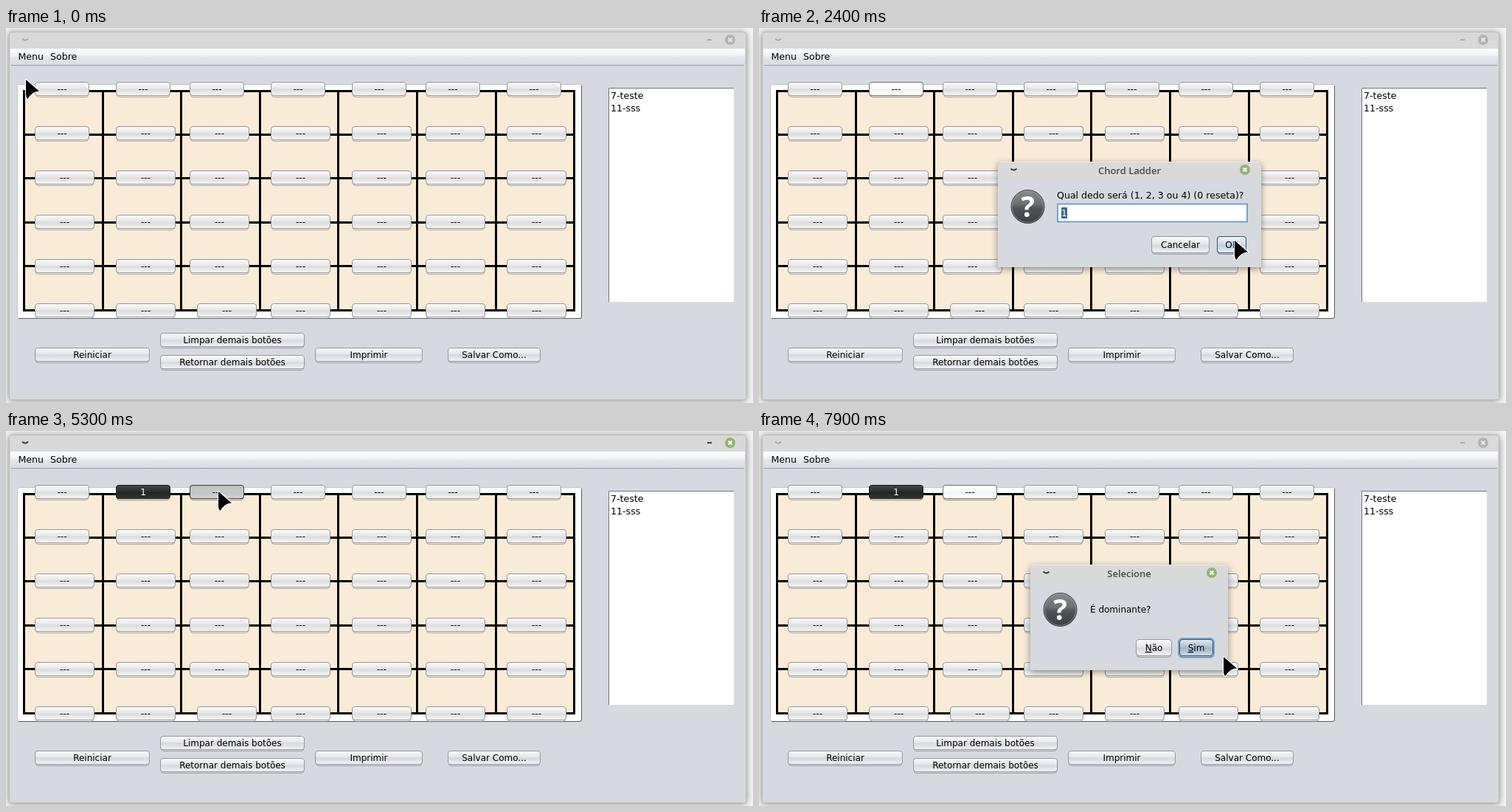
Write an HTML page that moves like this. It is 1013 px wide and 508 px high and loops after 8000 ms.

```html
<!DOCTYPE html>
<html lang="pt">
<head>
<meta charset="utf-8">
<title>Escalas</title>
<style>
html, body { margin: 0; width: 100%; height: 100%; overflow: hidden; background: #f4f4f4; }
svg { display: block; width: 1013px; height: 508px; }
text { font: 12px "DejaVu Sans", sans-serif; fill: #000; white-space: pre; }
.mid { text-anchor: middle; }
.title { font: 600 13px "Open Sans", "Noto Sans", sans-serif; fill: #4a4a4a; text-anchor: middle; }
.ask { font-size: 12.6px; }
.mark { font: 700 39px "Open Sans", sans-serif; fill: #fff; text-anchor: middle; }
#cursor { animation: move 8s infinite linear; }
@keyframes move {
  0% { transform: translate(27px, 70px); animation-timing-function: steps(2); }
  2.5%, 3.75% { transform: translate(348px, 195px); animation-timing-function: steps(5); }
  10% { transform: translate(212px, 96px); animation-timing-function: steps(3); }
  13.75%, 18.75% { transform: translate(191px, 81px); animation-timing-function: steps(4); }
  23.75%, 25% { transform: translate(502px, 246px); animation-timing-function: steps(2); }
  27.5% { transform: translate(695px, 317px); animation-timing-function: steps(2); }
  30%, 38.75% { transform: translate(645px, 288px); animation-timing-function: steps(3); }
  42.5% { transform: translate(572px, 302px); animation-timing-function: steps(3); }
  46.25% { transform: translate(563px, 287px); animation-timing-function: steps(1); }
  47.5%, 51.25% { transform: translate(580px, 287px); animation-timing-function: steps(8); }
  61.25% { transform: translate(310px, 100px); animation-timing-function: steps(3); }
  65%, 66.25% { transform: translate(288px, 82px); animation-timing-function: steps(3); }
  70%, 71.25% { transform: translate(490px, 246px); animation-timing-function: steps(3); }
  75% { transform: translate(651px, 294px); animation-timing-function: steps(1); }
  76.25%, 78.75% { transform: translate(640px, 285px); animation-timing-function: steps(3); }
  82.5% { transform: translate(703px, 280px); animation-timing-function: steps(6); }
  90%, 91.25% { transform: translate(628px, 285px); animation-timing-function: steps(6); }
  98.75%, 100% { transform: translate(630px, 306px); }
}
</style>
</head>
<body>
<svg id="stage" viewBox="0 0 1013 508"></svg>
<script>
const LOOP = 8000;
let css = '';

// Shows an element only inside the given [start, end) spans, in ms.
function show(id, ...spans) {
  const at = (ms, on) => `${ms / LOOP * 100}% { opacity: ${on} }`;
  const keys = [];
  if (spans[0][0] > 0) keys.push(at(0, 0));
  for (const [start, end] of spans) {
    keys.push(at(start, 1));
    if (end < LOOP) keys.push(at(end, 0));
  }
  keys.push(at(LOOP, spans.at(-1)[1] < LOOP ? 0 : 1));
  css += `@keyframes ${id} { ${keys.join(' ')} }\n#${id} { animation: ${id} 8s infinite step-end; }\n`;
}

const grads = {
  plain: ['#fcfcfc', '#e9e9e9', '#dcdcdc', '#f7f7f7'],
  blue: ['#fafbfc', '#e6e8ec', '#d5d8de', '#f3f5f9'],
  hover: ['#ffffff', '#fafafa', '#f3f3f3', '#ffffff'],
  press: ['#bdbdbd', '#c8c8c8', '#c2c2c2', '#d6d6d6'],
  dark: ['#454545', '#2f322f', '#222522', '#343634'],
  main: ['#e3eaf1', '#b4c3d2', '#a2b4c5', '#c9dcec'],
  mainHover: ['#f4f8fc', '#cfdeeb', '#bdd0e1', '#e2f2ff'],
  mainPress: ['#6f8ba4', '#7f9bb3', '#7591aa', '#94b0c8'],
  menu: ['#ffffff', '#f0f1f4', '#e2e5e9', '#d9dce2'],
  icon: ['#8a8c90', '#6d6f73', '#515358', '#3c3e42']
};
const stops = ['0', '.42', '.55', '1'];
const gradDefs = Object.entries(grads).map(([name, colors]) =>
  `<linearGradient id="g-${name}" x2="0" y2="1">${colors.map((c, i) =>
    `<stop offset="${stops[i]}" stop-color="${c}"/>`).join('')}</linearGradient>`).join('');

const rect = (x, y, w, h, fill, more = '') =>
  `<rect x="${x}" y="${y}" width="${w}" height="${h}" fill="${fill}" ${more}/>`;
const text = (x, y, s, cls = '') => `<text x="${x}" y="${y}" class="${cls}">${s}</text>`;
const group = (id, body) => `<g id="${id}">${body}</g>`;

function button(x, y, w, label, kind = 'plain', h = 19) {
  const edge = { dark: '#1c1e1c', press: '#3c3c3c', hover: '#6f7275' }[kind]
    || (kind.startsWith('main') ? '#39506a' : '#94979b');
  const ink = kind === 'dark' || kind === 'mainPress' ? 'style="fill:#fff"' : '';
  return rect(x + 1, y + 1.5, w - 2, h, 'none', 'rx="4" stroke="#6e7276" stroke-opacity=".55"')
    + rect(x + .5, y + .5, w - 1, h - 1, `url(#g-${kind})`, `rx="3.5" stroke="${edge}"`)
    + `<text class="mid" x="${x + w / 2}" y="${y + h / 2 + 4.5}" ${ink}>${label}</text>`;
}

const chevron = (x, y, color) =>
  `<path d="M${x - 4} ${y - 1.5}q4 4 8 0" fill="none" stroke="${color}" stroke-width="1.8"/>`;
const close = (x, y, fill, ink) => `<circle cx="${x}" cy="${y}" r="7" fill="${fill}"/>`
  + `<path d="M${x - 2.5} ${y - 2.5}l5 5m0 -5l-5 5" stroke="${ink}" stroke-width="1.8"/>`;
const titleButtons = (ink, fill, x) => chevron(26, 16, ink)
  + rect(951, 15, 6, 2, ink) + close(982, 16, fill, x);

function board() {
  let s = rect(15.5, 76.5, 765, 317, '#fff', 'rx="3" stroke="#c3c6cb"')
    + '<path d="M17 393.5H778Q780.500 393.500 780.500 391V78" fill="none" stroke="#595c60"/>'
    + rect(24.5, 85.5, 746, 297, '#faebd7', 'stroke="#000" stroke-width="3"');
  for (let i = 1; i < 7; i++) s += rect(Math.round(23 + i * 106.6), 84, 3, 300, '#000');
  for (let i = 1; i < 5; i++) s += rect(23, Math.round(84 + i * 59.4 - .5), 749, 3, '#000');
  const cols = [39, 149, 249, 359, 469, 569, 679];
  for (let row = 0; row < 6; row++) {
    cols.forEach((x, col) => {
      const small = row === 0 || (row === 1 && col === 0);
      s += button(x + (row === 5 && col === 2 ? 10 : 0), 73 + row * 60, small ? 74 : 81, '---');
    });
  }
  return s;
}

function dialog(x, w, title, body) {
  return rect(x, 184, w, 142, '#000', 'opacity=".42" filter="url(#blur)"')
    + `<path d="M${x} 324V184q0 -3 3 -3h${w - 6}q3 0 3 3V324z" fill="#d9d9d9"/>`
    + rect(x + 1, 205, w - 2, 118, '#d6d9df')
    + `<path d="M${x + 3} 181.500h${w - 6}" stroke="#ececec"/>`
    + chevron(x + 21.5, 192, '#3c3c3c') + close(x + w - 22, 192, '#92b372', '#fff')
    + text(x + w / 2, 198, title, 'title')
    + `<circle cx="${x + 40.5}" cy="242" r="22.5" fill="url(#g-icon)" stroke="#3d3f43"/>`
    + `<circle cx="${x + 40.5}" cy="242" r="21.300" fill="none" stroke="#a5a7aa" stroke-opacity=".6"/>`
    + text(x + 40.5, 256, '?', 'mark') + body;
}

const ok = kind => button(621, 282, 40, 'OK', kind, 23);
const sim = kind => button(570, 282, 46, '<tspan text-decoration="underline">S</tspan>im', kind, 23);

const fingerDialog = dialog(324, 357, 'Chord Ladder',
  text(404, 231, 'Qual dedo será (1, 2, 3 ou 4) (0 reseta)?', 'ask')
  + rect(405, 238.5, 257, 24, '#fff', 'stroke="#76a0cb" stroke-width="2"')
  + group('one', rect(410, 243, 8, 15, '#39698a') + '<text x="410" y="255" style="fill:#fff">1</text>')
  + group('two', text(410, 255, '2'))
  + button(532, 282, 79, 'Cancelar', 'blue', 23)
  + ok('main') + group('okHover', ok('mainHover')) + group('okPress', ok('mainPress')));

const rootDialog = dialog(368, 268, 'Selecione',
  text(449, 246, 'É dominante?')
  + button(511, 282, 49, '<tspan text-decoration="underline">N</tspan>ão', 'blue', 23)
  + rect(569, 281, 48, 25.5, 'none', 'rx="5" stroke="#73a4d1" stroke-width="2"')
  + sim('main') + group('simHover', sim('mainHover')) + group('simPress', sim('mainPress')));

const frame = rect(4, 6, 1000, 499, '#000', 'rx="4" opacity=".45" filter="url(#blur)"')
  + '<path d="M4.500 503.500V9q0 -3.500 3.500 -3.500H1000q3.500 0 3.500 3.500V503.500z" fill="#d9d9d9" stroke="#bdbdbd"/>'
  + rect(6, 28, 996, 474, '#d6d9df')
  + rect(6, 28, 996, 22, 'url(#g-menu)') + rect(7, 50, 994, 1, '#969eaa')
  + text(16.5, 43, 'Menu', 'ask') + text(60, 43, 'Sobre', 'ask')
  + group('idle', titleButtons('#ababab', '#b3b3b3', '#ececec'))
  + group('active', rect(18, 8, 16, 16, '#d9d9d9') + rect(948, 8, 44, 16, '#d9d9d9')
    + titleButtons('#3c3c3c', '#92b372', '#fff'));

const list = rect(817, 81, 170, 290, '#fff')
  + '<path d="M817.500 371V81.500H987" fill="none" stroke="#6f747c"/>'
  + text(820, 96, '7-teste', 'ask') + text(820, 113, '11-sss', 'ask');

const actions = [
  [39, 433, 156, 'Reiniciar'], [209, 413, 196, 'Limpar demais botões'],
  [209, 443, 196, 'Retornar demais botões'], [419, 433, 146, 'Imprimir'],
  [599, 433, 126, 'Salvar Como...']
].map(([x, y, w, label]) => button(x, y, w, label, 'blue')).join('');

const second = kind => button(149, 73, 74, kind === 'dark' ? '1' : '---', kind);
const third = kind => button(249, 73, 74, '---', kind);
const fretStates = group('secondHover', second('hover')) + group('secondPress', second('press'))
  + group('secondSet', second('dark'))
  + group('thirdHover', third('hover')) + group('thirdPress', third('press'));

const cursor = group('cursor', '<path d="M0 0L18 15.500Q13 15.500 9 18.500Q5 21.500 2.500 26Q0 24 0 20z"'
  + ' stroke="#fff" stroke-width="2.400" stroke-linejoin="round" paint-order="stroke"/>');

document.getElementById('stage').innerHTML =
  `<defs>${gradDefs}<filter id="blur" x="-20%" y="-20%" width="140%" height="140%">`
  + '<feGaussianBlur stdDeviation="5"/></filter></defs>'
  + frame + board() + fretStates + list + actions
  + group('finger', fingerDialog) + group('root', rootDialog) + cursor;

show('active', [400, 1300], [4200, 5400], [7500, 7700]);
show('secondHover', [1000, 1100], [1300, 4100]);
show('secondPress', [1100, 1300]);
show('secondSet', [4100, LOOP]);
show('thirdHover', [5000, 5300], [5400, LOOP]);
show('thirdPress', [5300, 5400]);
show('finger', [1300, 3100], [5400, 7500]);
show('root', [3200, 4100], [7700, LOOP]);
show('one', [0, 6400]);
show('two', [6600, LOOP]);
show('okHover', [2400, 2900], [6000, 6400], [7000, 7300]);
show('okPress', [2900, 3100], [7300, 7500]);
show('simHover', [3400, 3500], [3800, 3900]);
show('simPress', [3900, 4100]);
document.head.appendChild(document.createElement('style')).textContent = css;
</script>
</body>
</html>
```
